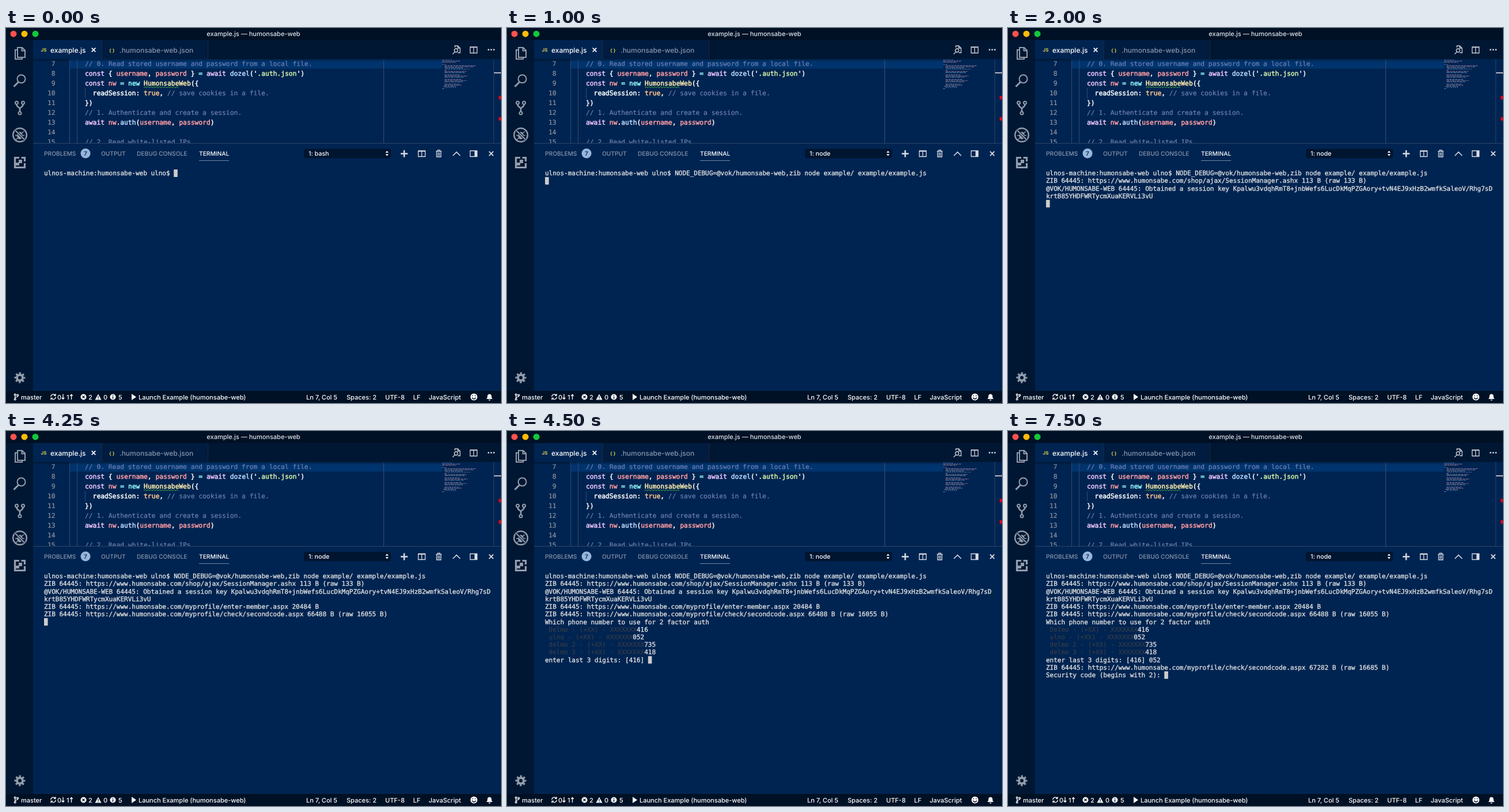
An HTML page that plays this animation: 859x652 px, repeating every 8 s.

```html
<!DOCTYPE html>
<html lang="en">
<head>
<meta charset="utf-8">
<title>Terminal session</title>
<style>
html, body { margin: 0; width: 100%; height: 100%; overflow: hidden; background: #002451; }
svg { display: block; width: 859px; height: 652px; }
text { white-space: pre; text-rendering: geometricPrecision; }
.ui { font-family: Inter, "Open Sans", sans-serif; font-weight: 500; fill: #fff; }
.title { font-size: 11px; fill: #dfe3e8; text-anchor: middle; }
.tab { font-size: 12px; }
.head { font-size: 10.2px; }
.pick { font-size: 10.7px; }
.status { font-size: 11px; }
.faint { fill: #8795ab; }
.kind { font-size: 8px; font-weight: 700; fill: #d6d34a; }
.code, .term { color: #fff; fill: currentColor; stroke: currentColor; }
.code tspan, .term tspan { fill: currentColor; stroke: currentColor; }
.code { font: 11.3px "DejaVu Sans Mono", monospace; stroke-width: .5; }
.num { color: #8f959f; text-anchor: end; stroke-width: .2; }
.kw { color: #f0c8ff; }
.op { color: #9ff; }
.var { color: #ff9da4; }
.fn { color: #bbdaff; }
.cls { color: #ffeead; }
.str { color: #d1f1a9; }
.val { color: #ffc58f; }
.com { color: #7285b7; stroke-width: .15; }
.term { font: 11px "DejaVu Sans Mono", monospace; color: #dedfe0; stroke-width: .35; }
.dim { color: #3a3f48; stroke-width: .1; }
.line { fill: none; stroke: #fff; stroke-width: 1.3; }
.side { fill: none; stroke: #939dab; stroke-width: 2; }
</style>
</head>
<body>
<svg id="stage" viewBox="0 0 859 652">
  <defs>
    <linearGradient id="shade" x2="0" y2="1">
      <stop stop-color="#000" stop-opacity=".35"/><stop offset="1" stop-color="#000" stop-opacity="0"/>
    </linearGradient>
  </defs>
  <rect width="859" height="652" fill="#002451"/>

  <!-- editor -->
  <rect x="110" y="54" width="647" height="16.5" fill="#00346e"/>
  <path d="M110.5 54V200M123.5 54V200M137.5 105V122" stroke="#36496f"/>
  <path d="M655.5 54V200" stroke="#3c4f6e"/>
  <g id="code"></g>
  <path id="squiggle" fill="none" stroke="#4fae3d"/>
  <g id="minimap"></g>
  <path d="M846.5 54V200" stroke="#2b4066"/>
  <path d="M847 78H859" stroke="#b4bac6" stroke-width="2"/>
  <path d="M855 118h4v6h-4zM855 155h4v6h-4z" fill="#e3001b"/>
  <rect x="47" y="54" width="710" height="5" fill="url(#shade)"/>

  <!-- title and tabs -->
  <rect width="859" height="21" fill="#001126"/>
  <circle cx="13" cy="10.200" r="5.500" fill="#ff524f"/>
  <circle cx="32" cy="10.200" r="5.500" fill="#fdbc08"/>
  <circle cx="51" cy="10.200" r="5.500" fill="#12c93a"/>
  <rect x="47" y="21" width="812" height="33" fill="#001733"/>
  <rect x="47" y="21" width="119" height="33" fill="#002451"/>
  <rect x="167" y="21" width="183" height="33" fill="#001c40"/>
  <path d="M166.500 21v33M350.500 21v33" stroke="#252526"/>
  <path class="line" d="M148.700 34.700l6.600 6.600m0-6.600l-6.600 6.600" style="stroke-width:1.700"/>
  <g class="line" style="stroke:#c9d0da">
    <path d="M779 34v-3h5l4 4v8h-4M784 31v4h4"/>
    <circle cx="781" cy="39" r="3"/><path d="M779 41.500l-4 4"/>
    <path d="M805.500 33h12v10.500h-12zM811.500 33v10.500M805 33.700h13"/>
  </g>
  <path d="M836 36.500h2.600v2.600h-2.600zM840.700 36.500h2.600v2.600h-2.600zM845.400 36.500h2.600v2.600h-2.600z" fill="#c9d0da"/>

  <!-- activity bar -->
  <rect y="21" width="47" height="610" fill="#001733"/>
  <g class="side">
    <path d="M20 34h8l5 5v12h-13zM27.500 34v5.500h5M20 38h-4v16h12v-3"/>
    <circle cx="26.500" cy="88.500" r="7"/><path d="M21.500 94l-8 8" stroke-width="3"/>
    <circle cx="18.500" cy="130" r="2.500"/><circle cx="29.500" cy="130" r="2.500"/><circle cx="24" cy="148" r="2.500"/>
    <path d="M18.500 133c0 5 5.500 4 5.500 8v4m0-4c0-4 5.500-3 5.500-8" stroke-width="2.500"/>
    <circle cx="24" cy="186" r="11.800" stroke-width="2.400"/>
    <ellipse cx="24" cy="187" rx="3.800" ry="5.500" fill="#939dab"/>
    <path d="M16 187h16M17 180l4 3m10-3l-4 3M17 194l4-3m10 3l-4-3" stroke-width="1.500"/>
    <path d="M15.500 177.500l17 17" stroke="#001733" stroke-width="4"/><path d="M15.500 177.500l17 17"/>
    <path d="M23 225.500h-7.500v17h17v-7.500M32.500 232v-6.500h-6" stroke-width="3.200"/>
    <path d="M22 229h6v6h-6zM17 234h6v5h-6z" fill="#939dab" stroke="none"/>
    <circle cx="24" cy="608" r="5" stroke-width="4"/>
    <circle cx="24" cy="608" r="8" stroke-width="3" stroke-dasharray="3.140 3.143" stroke-dashoffset="1.570"/>
  </g>

  <!-- panel -->
  <rect x="47" y="200" width="812" height="431" fill="#002451"/>
  <path d="M47 200.500H859" stroke="#2d4468"/>
  <circle cx="138" cy="218" r="8.500" fill="#96b6dc"/>
  <path d="M335 230.500H387" stroke="#7187ab"/>
  <rect x="517" y="210" width="151" height="16.500" rx="4" fill="#001530"/>
  <path d="M658.500 216.800l2.700-3.300 2.700 3.300zM658.500 219.200l2.700 3.300 2.700-3.300z" fill="#fff"/>
  <g class="line" style="stroke:#d5dae2">
    <path d="M685 218.500h12M691 212.500v12" style="stroke-width:2.600"/>
    <path d="M715.500 213.500h12v10h-12zM721.500 213.500v10M715 214.300h13"/>
    <path d="M746 214.500h10M749 214v-1.700h4v1.700M747.300 215.500v8.500h7.400v-8.500M749.800 216.500v6m2.400-6v6"/>
    <path d="M775.500 222l6.300-6.300 6.300 6.300" style="stroke-width:1.600"/>
    <path d="M805.500 213.500h12v10h-12z"/><path d="M815 213v11" style="stroke-width:4"/>
    <path d="M838.300 214.700l7.400 7.400m0-7.400l-7.400 7.400" style="stroke-width:1.900"/>
  </g>
  <g id="terminal"></g>

  <!-- status bar -->
  <rect y="631" width="859" height="21" fill="#001126"/>
  <g class="line">
    <circle cx="15.700" cy="637.500" r="1.400"/><circle cx="15.700" cy="645.500" r="1.400"/><circle cx="20.300" cy="638.500" r="1.400"/>
    <path d="M15.700 639v5M20.300 640c0 2-4.600 1.500-4.600 3.500"/>
    <path d="M77.800 641a4.200 4.200 0 0 1 7.600-2.400M86.200 641.500a4.200 4.200 0 0 1-7.600 2.400M86 636v3h-3M78 646.500v-3h3"/>
    <path d="M99 636.500v8.500m-2.200-2.300l2.200 2.500 2.200-2.500M113.500 646v-8.500m-2.200 2.300l2.200-2.500 2.200 2.500"/>
  </g>
  <circle cx="134.500" cy="641.500" r="5" fill="#fff"/>
  <path d="M132.500 639.500l4 4m0-4l-4 4" stroke="#001126" stroke-width="1.300"/>
  <path d="M160 636.500l5.500 10h-11z" fill="#fff"/>
  <path d="M160 640v3.300m0 1v1.300" stroke="#001126" stroke-width="1.300"/>
  <circle cx="185.500" cy="641.500" r="5" fill="#fff"/>
  <path d="M185.500 638.300v1.400m0 1v4" stroke="#001126" stroke-width="1.500"/>
  <path d="M218 636l8 5.500-8 5.500z" fill="#fff"/>
  <circle cx="812" cy="641.500" r="6" fill="#fff"/>
  <path d="M809 642.500a3.100 3.100 0 0 0 6 0M809.800 638.400v1.800m4.400-1.800v1.800" fill="none" stroke="#001126" stroke-width="1.300"/>
  <path d="M833.500 645c2-1.500 1.800-3 2-5a3.500 3.500 0 0 1 7 0c.2 2 0 3.500 2 5zM837.300 646h3.400a1.700 1.700 0 0 1-3.400 0z" fill="#fff"/>
  <g id="labels"></g>
</svg>
<script>
const LOOP = 8000;
const byId = id => document.getElementById(id);

function add(parent, tag, attrs = {}, content = '') {
  const el = document.createElementNS('http://www.w3.org/2000/svg', tag);
  for (const key in attrs) el.setAttribute(key, attrs[key]);
  el.textContent = content;
  return parent.appendChild(el);
}

// A run is a plain string or a [class, string] pair.
function addText(parent, x, y, cls, ...runs) {
  const el = add(parent, 'text', { x, y, class: cls });
  for (const run of runs) {
    const [kind, words] = Array.isArray(run) ? run : ['', run];
    add(el, 'tspan', { class: kind }, words);
  }
  return el;
}

// Keeps an element visible only between two times of the loop.
function showBetween(el, from, to = LOOP) {
  const step = (visibility, time) => ({ visibility, offset: time / LOOP, easing: 'step-end' });
  el.animate(
    [step('hidden', 0), step('visible', from), step('hidden', to), step('hidden', LOOP)],
    { duration: LOOP, iterations: Infinity }
  );
}

// Editor lines
const code = [
  [['com', '// 0. Read stored username and password from a local file.']],
  [['kw', 'const'], ' { ', ['var', 'username'], ', ', ['var', 'password'], ' } ', ['op', '='], ' ',
    ['kw', 'await'], ' ', ['fn', 'dozel'], "('", ['str', '.auth.json'], "')"],
  [['kw', 'const'], ' ', ['var', 'nw'], ' ', ['op', '='], ' ', ['op', 'new'], ' ', ['cls', 'HumonsabeWeb'], '({'],
  ['  readSession: ', ['val', 'true'], ', ', ['com', '// save cookies in a file.']],
  ['})'],
  [['com', '// 1. Authenticate and create a session.']],
  [['kw', 'await'], ' ', ['var', 'nw'], '.', ['fn', 'auth'], '(', ['var', 'username'], ', ', ['var', 'password'], ')'],
  [],
  [['com', '// 2. Read white-listed IPs.']]
];
code.forEach((runs, i) => {
  const y = 66 + 17 * i;
  addText(byId('code'), 85.5, y, 'code num', String(7 + i));
  addText(byId('code'), 137, y, 'code', ...runs);
});
byId('squiggle').setAttribute('d', 'M239 104' + 'l2.500 -2l2.500 2'.repeat(12));

// Minimap: [indent, width] for each row, zero width is blank
const mapRows = [[0, 18], [0, 31], [0, 24], [0, 0], [0, 7], [4, 54], [4, 50], [4, 32], [6, 42], [4, 3],
  [4, 38], [4, 35], [0, 0], [4, 27], [4, 40], [4, 33], [0, 0], [4, 29], [4, 38], [4, 33],
  [0, 0], [4, 26], [4, 30], [2, 22], [4, 20], [0, 3]];
const mapColors = ['#7285b7', '#c9a6de', '#d8a0b0', '#a9c0d8'];
mapRows.forEach(([indent, width], i) => add(byId('minimap'), 'path', {
  d: `M${757 + indent} ${55.5 + 2 * i}h${width}`,
  stroke: mapColors[i % 4], opacity: .65, 'stroke-dasharray': `${3 + i % 4} 1 ${2 + i % 3} 1`
}));

// Interface labels
const labels = [
  [429.500, 14.200, 'title', 'example.js — humonsabe-web'],
  [60.500, 41, 'kind', 'JS'], [77, 42.500, 'tab', 'example.js'],
  [179, 41.500, 'kind', '{ }'], [197, 42.500, 'tab faint', '.humonsabe-web.json'],
  [66, 222, 'head faint', 'PROBLEMS'], [165, 222, 'head faint', 'OUTPUT'],
  [227, 222, 'head faint', 'DEBUG CONSOLE'], [335, 222, 'head', 'TERMINAL'],
  [26, 645.500, 'status', 'master'], [89, 645.500, 'status', '0'], [105, 645.500, 'status', '1'],
  [143, 645.500, 'status', '2'], [169, 645.500, 'status', '0'], [195, 645.500, 'status', '5'],
  [230, 645.500, 'status', 'Launch Example (humonsabe-web)'],
  [521, 645.500, 'status', 'Ln 7, Col 5'], [591, 645.500, 'status', 'Spaces: 2'],
  [658, 645.500, 'status', 'UTF-8'], [706.500, 645.500, 'status', 'LF'], [733.500, 645.500, 'status', 'JavaScript']
];
for (const [x, y, cls, words] of labels) addText(byId('labels'), x, y, 'ui ' + cls, words);
addText(byId('labels'), 135, 221.800, 'ui head', '7').style.fill = '#001733';
showBetween(addText(byId('labels'), 525, 222, 'ui pick', '1: bash'), 0, 1000);
showBetween(addText(byId('labels'), 525, 222, 'ui pick', '1: node'), 1000);

// Terminal
const terminal = byId('terminal');
const colX = col => 66 + 6.622 * col;
const rowY = row => 246 + 13.220 * row;
const site = 'ZIB 64445: https://www.humonsabe.com/';
const phone = (name, digits) => [['dim', ` ${name} - (+XX) - XXXXXXX`], digits];

// [time, row, column, runs]
const output = [
  [0, 0, 0, ['ulnos-machine:humonsabe-web ulno$ ']],
  [750, 0, 34, ['NODE_DEBUG=@vok/humonsabe-web,zib node example/ example/example.js']],
  [2000, 1, 0, [site + 'shop/ajax/SessionManager.ashx 113 B (raw 133 B)']],
  [2000, 2, 0, ['@VOK/HUMONSABE-WEB 64445: Obtained a session key ' +
    'Kpalwu3vdqhRmT8+jnbWefs6LucDkMqPZGAory+tvN4EJ9xHzB2wmfkSaleoV/Rhg7sD']],
  [2000, 3, 0, ['krtB85YHDFWRTycmXuaKERVLi3vU']],
  [3250, 4, 0, [site + 'myprofile/enter-member.aspx 20484 B']],
  [4250, 5, 0, [site + 'myprofile/check/secondcode.aspx 66488 B (raw 16055 B)']],
  [4500, 6, 0, ['Which phone number to use for 2 factor auth']],
  [4500, 7, 0, phone('Delmo', '416')],
  [4500, 8, 0, phone('ulno', '052')],
  [4500, 9, 0, phone('delmo 2', '735')],
  [4500, 10, 0, phone('delmo 3', '418')],
  [4500, 11, 0, ['enter last 3 digits: [416] ']],
  [5250, 11, 27, ['0']],
  [5500, 11, 28, ['52']],
  [7500, 12, 0, [site + 'myprofile/check/secondcode.aspx 67282 B (raw 16685 B)']],
  [7500, 13, 0, ['Security code (begins with 2): ']]
];
for (const [time, row, col, runs] of output)
  showBetween(addText(terminal, colX(col), rowY(row) + 10.200, 'term', ...runs), time);

// [time, row, column]
const cursor = [[0, 0, 34], [750, 0, 100], [1000, 1, 0], [2000, 4, 0], [3250, 5, 0], [4250, 6, 0],
  [4500, 11, 27], [5250, 11, 28], [5500, 11, 30], [5750, 12, 0], [7500, 13, 31]];
cursor.forEach(([time, row, col], i) => {
  const block = add(terminal, 'rect', { x: colX(col), y: rowY(row), width: 6.600, height: 13, fill: '#cccccc' });
  showBetween(block, time, cursor[i + 1]?.[0]);
});
</script>
</body>
</html>
```
